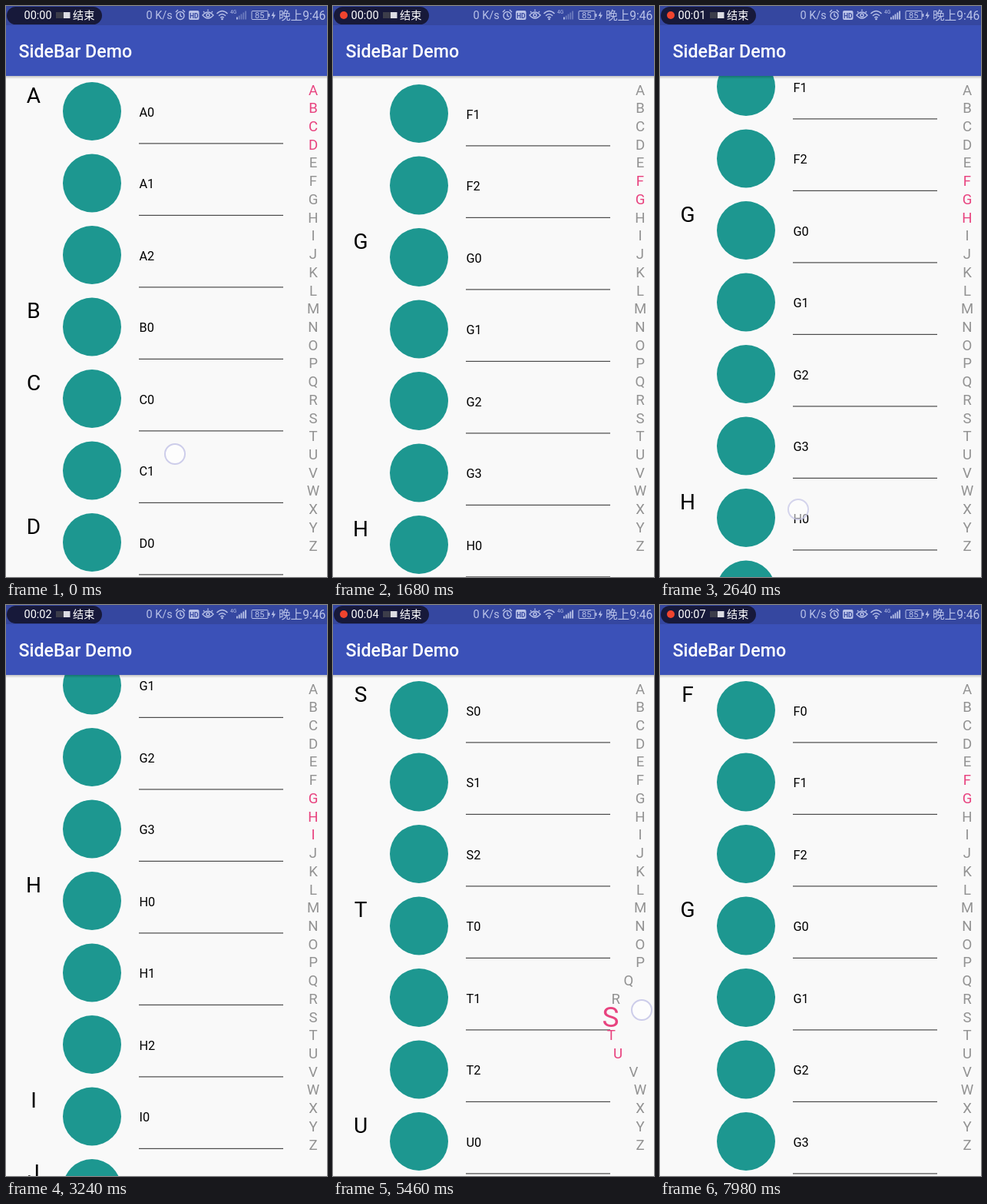
Animation, 418 px wide and 743 px high, one loop 8.1 s. Source, as an HTML page:

```html
<!DOCTYPE html>
<html lang="en">
<head>
<meta charset="utf-8">
<title>SideBar Demo</title>
<style>
  html, body { margin: 0; width: 100%; height: 100%; overflow: hidden; background: #f9f9f9; }
  svg { display: block; width: 418px; height: 743px; }
  text { font-family: Roboto, "Noto Sans CJK SC", "Noto Sans CJK", sans-serif; }
  .head { font-size: 28px; text-anchor: middle; }
  .name { font-size: 16.3px; }
  .key { text-anchor: middle; }
</style>
</head>
<body>
<svg id="stage" viewBox="0 0 418 743">
  <defs>
    <linearGradient id="shade" x2="0" y2="1">
      <stop stop-color="#000" stop-opacity=".28"/>
      <stop offset="1" stop-color="#000" stop-opacity="0"/>
    </linearGradient>
  </defs>
  <rect width="418" height="743" fill="#f9f9f9"/>
  <g id="list"></g>
  <rect y="90" width="418" height="5" fill="url(#shade)"/>
  <rect y="25" width="418" height="66" fill="#3b51b8"/>
  <rect width="418" height="25" fill="#3547a0"/>
  <text x="16.5" y="67" font-size="23.2" font-weight="500" fill="#fff">SideBar Demo</text>

  <rect x="1" y="1" width="124" height="23" rx="11.5" fill="#17193a"/>
  <circle id="dot" cx="14" cy="12" r="5" fill="#f0442e"/>
  <text id="clock" x="23.5" y="17" font-size="14.5" fill="#fff"></text>
  <rect x="65" y="8" width="10" height="8" fill="#3c3d4a"/>
  <rect x="75" y="8" width="8.5" height="8" fill="#dcdce2"/>
  <text x="87" y="17" font-size="14.2" fill="#fff">结束</text>

  <g fill="none" stroke="#b9c2e8" stroke-width="1.4">
    <circle cx="227" cy="12.5" r="5"/>
    <path d="M227 9.5v3.3l2.4 1.4M221 8l3-3M233 8l-3-3"/>
    <path d="M256 12q7-8 14 0q-7 8-14 0z"/>
    <circle cx="263" cy="12" r="2"/>
    <path d="M257 7l1.5 1.5M263 4.500v2M269 7l-1.500 1.500"/>
    <path d="M274.500 10q7-7 14 0M277 12.800q4.500-4.500 9 0M279.300 15.300q2.200-2.200 4.400 0"/>
    <rect x="320" y="6.500" width="21" height="11" rx="1" stroke-width="1"/>
  </g>
  <g fill="#b9c2e8">
    <text x="182.500" y="17" font-size="14.500">0 K/s</text>
    <rect x="238" y="6" width="13.500" height="12" rx="2"/>
    <text x="239" y="15.500" font-size="8.500" font-weight="700" fill="#3547a0">HD</text>
    <circle cx="281.500" cy="17" r="1.300"/>
    <text x="292" y="10" font-size="6.500">4G</text>
    <g id="bars"></g>
    <text x="324" y="16" font-size="11">85</text>
    <rect x="341.500" y="10" width="1.800" height="4"/>
    <path d="M349 7l-3.500 6h2.500l-.8 4.500l3.800-6h-2.500z"/>
    <text x="355" y="17.500" font-size="15.600">晚上9:46</text>
  </g>
  <g id="side"></g>
  <circle id="ring" r="13" fill="#fff" fill-opacity=".65" stroke="#cdcdea" stroke-width="2"/>
</svg>
<script>
const LOOP = 8100, HOLD = 720, STEP = 60, LAST = 7980;
const ROW = 93.5, TOP = 91, HEIGHT = 743;
const GAP = 23.72, KEY_Y = 109, KEY_X = 400;
const PINK = '#e8437f', GRAY = '#929292';
const COUNTS = [...'31241343124231342333213242'].map(Number);

const $ = id => document.getElementById(id);
const clamp = (v, lo, hi) => Math.max(lo, Math.min(hi, v));

function add(parent, tag, attrs, text) {
  const el = document.createElementNS('http://www.w3.org/2000/svg', tag);
  for (const k in attrs) el.setAttribute(k, attrs[k]);
  if (text) el.textContent = text;
  parent.append(el);
  return el;
}

// Linear interpolation through [time, value] points.
function at(points, t) {
  let i = points.findIndex(p => p[0] > t);
  if (i === 0) return points[0][1];
  if (i < 0) return points[points.length - 1][1];
  const [t0, a] = points[i - 1], [t1, b] = points[i];
  return a + (b - a) * (t - t0) / (t1 - t0);
}

const SCROLL = [[660, 0], [780, 18], [960, 95], [1140, 207], [1200, 290], [1320, 580],
  [1440, 845], [1560, 1020], [1680, 1119], [1800, 1146], [1920, 1154],
  [2640, 1154], [2760, 1200], [3120, 1385], [3240, 1435], [3420, 1480], [3600, 1498], [3720, 1503]];

// Each touch: start, release, and its path in x and y.
const TOUCHES = [
  { from: -200, to: 1200, x: [[660, 220], [1140, 282], [1260, 296]],
    y: [[660, 583], [780, 566], [960, 492], [1140, 395], [1260, 318]] },
  { from: 2540, to: 3120, x: [[2640, 180], [3120, 225]],
    y: [[2640, 655], [2760, 600], [3120, 415], [3240, 360]] },
  { from: 3960, to: 7380, x: [[4140, 404], [5460, 402]],
    y: [[4140, 199], [5460, 527], [6120, 690], [6420, 690], [7380, 212]] }
];
const SLIDE = TOUCHES[2];
const BULGE = [[4140, 0], [4320, 1], [7380, 1], [7680, 0]];

const rows = [], firstRow = [], keys = [];
COUNTS.forEach((count, i) => {
  const letter = String.fromCharCode(65 + i);
  firstRow.push(rows.length);
  for (let n = 0; n < count; n++) {
    const y = 137 + rows.length * ROW;
    if (!n) add($('list'), 'text', { class: 'head', x: 36, y: y - 11.5 }, letter);
    add($('list'), 'circle', { cx: 112, cy: y, r: 38, fill: '#1d9790' });
    add($('list'), 'text', { class: 'name', x: 173.5, y: y + 6.5 }, letter + n);
    add($('list'), 'rect', { x: 173, y: y + 41.3, width: 188, height: 1.2, fill: '#4a4a4a' });
    rows.push(i);
  }
  keys.push(add($('side'), 'text', { class: 'key' }, letter));
});
const bars = [3, 5, 7, 9, 11].map((h, i) =>
  add($('bars'), 'rect', { x: 300 + i * 2.8, y: 17.5 - h, width: 1.8, height: h }));

function bend(d) {
  const r = 78.8;
  return Math.abs(d) < 68 ? Math.sqrt(r * r - d * d) - r + 39 : 0;
}

function draw(t) {
  const center = at(SLIDE.y, t) + 18;
  const picked = clamp(Math.floor((center - KEY_Y) / GAP + .5), 0, 25);
  const scroll = t > 4140
    ? Math.min(firstRow[picked] * ROW, rows.length * ROW - HEIGHT + TOP)
    : at(SCROLL, t);
  $('list').setAttribute('transform', `translate(0 ${-Math.round(scroll * 2) / 2})`);

  const shown = new Set(rows.filter((_, n) => {
    const y = TOP + n * ROW - scroll;
    return y > TOP - 2 && y + ROW < HEIGHT + 4;
  }));
  const bulge = at(BULGE, t);
  keys.forEach((key, i) => {
    const y = KEY_Y + i * GAP;
    const big = i === picked ? bulge : 0;
    const size = 18.6 + 18.4 * big;
    key.setAttribute('x', KEY_X - bulge * bend(y - center));
    key.setAttribute('y', y + size * .355);
    key.setAttribute('font-size', size);
    key.setAttribute('fill', shown.has(i) || big ? PINK : GRAY);
  });

  const touch = TOUCHES.find(p => t >= p.from && t < p.to + 120);
  $('ring').setAttribute('opacity', touch
    ? Math.min(1, (t - touch.from) / 120, 1 - (t - touch.to) / 120) : 0);
  if (touch) {
    $('ring').setAttribute('cx', at(touch.x, t));
    $('ring').setAttribute('cy', at(touch.y, t));
  }

  $('clock').textContent = '00:0' + Math.max(0, Math.floor((t - 900) / 1000));
  const phase = t % 1000;
  $('dot').setAttribute('opacity', phase >= 400 && phase < 990 ? 1 : 0);
  bars.forEach((bar, i) => bar.setAttribute('opacity', t >= 2400 || i < 1 ? 1 : .4));
}

const start = performance.now();
function tick() {
  const t = (performance.now() - start) % LOOP;
  draw(t < HOLD ? 0 : Math.min(LAST, Math.floor(t / STEP) * STEP));
  requestAnimationFrame(tick);
}
tick();
</script>
</body>
</html>
```
